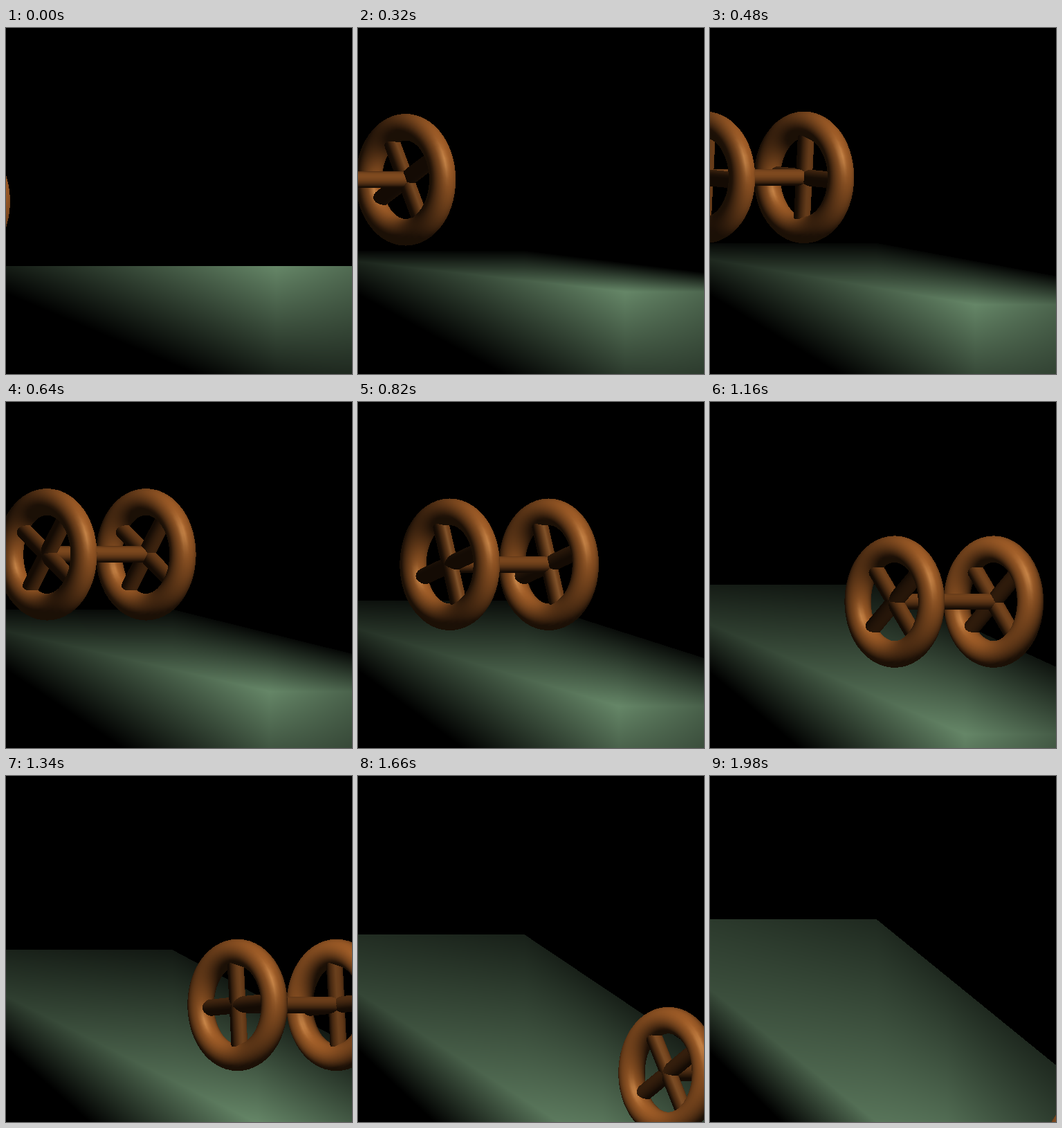
These frames come from a looping animation (500x500 px, 2000 ms). An HTML page with a canvas:

```html
<!DOCTYPE html>
<html lang="en">
<head>
<meta charset="utf-8">
<title>Rolling axle</title>
<style>
html, body { margin: 0; width: 100%; height: 100%; overflow: hidden; background: #000; }
canvas { display: block; width: 500px; height: 500px; }
</style>
</head>
<body>
<canvas id="stage" width="500" height="500"></canvas>
<script>
const SIZE = 500, LOOP = 2000, STEP = 20;
const RING = 76, TUBE = 19.3, ROD = 12, SPOKE = 62, GAP = 143;
const COS = 0.7, SIN = 0.714;
const TAU = Math.PI * 2;

const ctx = document.getElementById('stage').getContext('2d');
const image = ctx.createImageData(SIZE, SIZE);
const pixels = new Uint32Array(image.data.buffer);
const depth = new Float32Array(SIZE * SIZE);

const clamp = v => v < 0 ? 0 : v > 255 ? 255 : v;
const rgb = (r, g, b) => (255 << 24 | clamp(b) << 16 | clamp(g) << 8 | clamp(r)) >>> 0;

// Lit slab: a top face and a front face that meet in a bright ridge.
function drawFloor(t) {
  const backY = 344 - 0.0692 * t;
  const sideY = 344 + 0.028 * t + 4.8e-6 * t * t;
  const leftY = 344 - 0.022 * t + 2e-6 * t * t;
  const peakX = 390 - 0.012 * t - 6e-6 * t * t;
  const peakY = 344 + 0.1135 * t + 3e-6 * t * t;
  const leftLight = 0.22 + 0.00018 * t;
  const backLight = 0.27 * Math.pow(t / 1800, 1.3);
  const darkY = leftY + 40 + 0.026 * t;
  const darkX = 80 + 170 * Math.exp(-t / 750);

  for (let x = 0; x < SIZE; x++) {
    const top = x < 240 ? backY : backY + (sideY - backY) * (x - 240) / 260;
    const topLight = backLight * (1 + 0.4 * Math.max(0, 1 - x / 240));
    const k = x / peakX;
    const ridge = Math.max(top, k < 1 ? leftY + (peakY - leftY) * k : peakY);
    const light = k < 1
      ? leftLight + (1 - leftLight) * Math.pow(k, 1.1)
      : 1 - (0.2 + 0.0001 * t) * (x - peakX) / (SIZE - peakX);
    const dark = darkY + (490 - darkY) * x / darkX;

    for (let y = Math.max(0, Math.round(top)); y < SIZE; y++) {
      const i = y < ridge
        ? topLight + (light - topLight) * (y - top) / (ridge - top)
        : light * (1 - (y - ridge) / (dark - ridge));
      if (i <= 0) break;
      pixels[y * SIZE + x] = rgb(102 * i, 135 * i, 104 * i);
    }
  }
}

// Vertices are [x, y, z, diffuse, shine].
function triangle(a, b, c) {
  const area = (b[0] - a[0]) * (c[1] - a[1]) - (b[1] - a[1]) * (c[0] - a[0]);
  if (Math.abs(area) < 1e-6) return;
  const x0 = Math.max(0, Math.ceil(Math.min(a[0], b[0], c[0])));
  const x1 = Math.min(SIZE - 1, Math.floor(Math.max(a[0], b[0], c[0])));
  const y0 = Math.max(0, Math.ceil(Math.min(a[1], b[1], c[1])));
  const y1 = Math.min(SIZE - 1, Math.floor(Math.max(a[1], b[1], c[1])));
  for (let y = y0; y <= y1; y++) {
    for (let x = x0; x <= x1; x++) {
      const u = ((b[0] - x) * (c[1] - y) - (b[1] - y) * (c[0] - x)) / area;
      const v = ((c[0] - x) * (a[1] - y) - (c[1] - y) * (a[0] - x)) / area;
      const w = 1 - u - v;
      if (u < -1e-6 || v < -1e-6 || w < -1e-6) continue;
      const z = u * a[2] + v * b[2] + w * c[2];
      const at = y * SIZE + x;
      if (z <= depth[at]) continue;
      depth[at] = z;
      const d = u * a[3] + v * b[3] + w * c[3];
      const s = u * a[4] + v * b[4] + w * c[4];
      pixels[at] = rgb(174 * d + 48 * s, 101 * d + 46 * s, 43 * d + 36 * s);
    }
  }
}

function unit(x, y, z) {
  const n = Math.hypot(x, y, z);
  return [x / n, y / n, z / n];
}

// Wheel axes: p across the disc, q down, r along the axle.
function makeShader(hubX, hubY, lightX, shift = 0, gain = 1) {
  const l = unit((400 - lightX) / 600, -0.55, 0.75);
  const h = unit(l[0], l[1], l[2] + 1);
  return (p, q, r, np, nq, nr) => {
    const nx = COS * np + SIN * nr, nz = SIN * np - COS * nr;
    const diff = Math.max(0, nx * l[0] + nq * l[1] + nz * l[2]);
    const spec = Math.max(0, nx * h[0] + nq * h[1] + nz * h[2]);
    const along = r + shift / SIN;
    return [
      hubX + COS * p + SIN * along, hubY + q, SIN * p - COS * along,
      gain * (0.16 + 0.76 * diff), gain * gain * Math.pow(spec, 35)
    ];
  };
}

function mesh(nu, nv, point) {
  let last;
  for (let i = 0; i <= nu; i++) {
    const row = [];
    for (let j = 0; j <= nv; j++) row.push(point(i / nu, j / nv));
    if (last) {
      for (let j = 0; j < nv; j++) {
        triangle(last[j], row[j], row[j + 1]);
        triangle(last[j], row[j + 1], last[j + 1]);
      }
    }
    last = row;
  }
}

function torus(shade) {
  mesh(56, 28, (u, v) => {
    const c = Math.cos(u * TAU), s = Math.sin(u * TAU);
    const n = Math.cos(v * TAU), r = Math.sin(v * TAU);
    const d = RING + TUBE * n;
    return shade(d * c, d * s, TUBE * r, n * c, n * s, r);
  });
}

function spoke(shade, angle) {
  const c = Math.cos(angle), s = Math.sin(angle);
  mesh(4, 18, (u, v) => {
    const d = (u * 2 - 1) * SPOKE;
    const e = Math.cos(v * TAU), r = Math.sin(v * TAU);
    return shade(d * c - ROD * e * s, d * s + ROD * e * c, ROD * r, -e * s, e * c, r);
  });
}

function wheel(x, y, angle, shift) {
  torus(makeShader(x, y, x + shift, shift));
  // The rods catch the lamp more from the right than the rims do.
  const shade = makeShader(x, y, x + shift - 220, shift, 0.72);
  spoke(shade, angle);
  spoke(shade, angle + Math.PI / 2);
}

function axle(x, y) {
  const shade = makeShader(x, y, x + GAP / 2, 0, 0.8);
  mesh(6, 18, (u, v) => {
    const p = Math.cos(v * TAU), q = Math.sin(v * TAU);
    return shade(ROD * p, ROD * q, u * GAP / SIN, p, q, 0);
  });
}

function draw(t) {
  pixels.fill(0xff000000);
  depth.fill(-1e9);
  drawFloor(t);
  const x = -210 + 0.424 * t - 1e-8 * t ** 3;
  const y = 250 - 0.149 * t + 0.000162 * t * t - 4.5e-9 * t ** 3;
  const angle = (0.2 * t - 2) * Math.PI / 180;
  wheel(x, y, angle, 0);
  wheel(x, y, angle, GAP);
  axle(x, y);
  ctx.putImageData(image, 0, 0);
}

const start = performance.now();
let shown = -1;
function tick() {
  const t = Math.floor((performance.now() - start) % LOOP / STEP) * STEP;
  if (t !== shown) draw(shown = t);
  requestAnimationFrame(tick);
}
tick();
</script>
</body>
</html>
```
